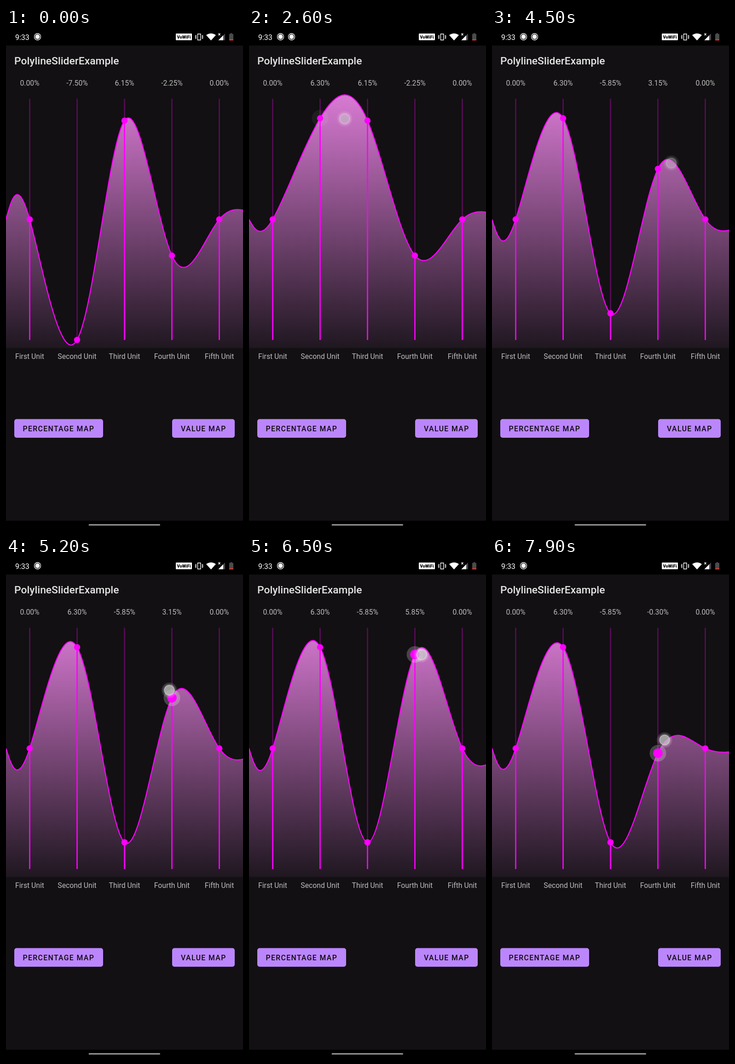
An HTML page that plays this animation: 515x1087 px, repeating every 8 s.

```html
<!DOCTYPE html>
<html lang="en">
<head>
<meta charset="utf-8">
<style>
  html, body { margin: 0; height: 100%; overflow: hidden; background: #000; }
  svg { display: block; width: 100%; height: 100%; font-family: Roboto, sans-serif; }
  .label { font-size: 15.75px; fill: #bdbcbd; text-anchor: middle; }
  .button { font-size: 15.75px; font-weight: 500; letter-spacing: 1.41px; fill: #0c090f; }
</style>
</head>
<body>
<svg id="stage" viewBox="0 0 515 1087">
  <defs>
    <linearGradient id="shade" gradientUnits="userSpaceOnUse" x1="0" y1="145" x2="0" y2="694">
      <stop offset="0" stop-color="#d87ad3"/>
      <stop offset="1" stop-color="#1f1720"/>
    </linearGradient>
    <radialGradient id="glow">
      <stop offset="0" stop-color="#c4c4c4" stop-opacity=".78"/>
      <stop offset=".5" stop-color="#cacaca" stop-opacity=".78"/>
      <stop offset=".6" stop-color="#e8e8e8" stop-opacity=".8"/>
      <stop offset=".66" stop-color="#fff" stop-opacity=".3"/>
      <stop offset="1" stop-color="#fff" stop-opacity="0"/>
    </radialGradient>
  </defs>
  <rect width="515" height="1087"/>
  <rect y="38" width="515" height="1031" fill="#121012"/>
  <rect x="179.5" y="1076.5" width="155.500" height="3" rx="1.500" fill="#9b9b9b"/>

  <!-- status bar -->
  <g fill="#fff">
    <text x="20" y="25.500" font-size="16">9:33</text>
    <g id="rec">
      <circle cx="68.500" cy="19" r="7" fill="none" stroke="#fff" stroke-width="1.300"/>
      <circle cx="68.500" cy="19" r="4.900"/>
    </g>
    <use id="rec2" href="#rec" x="24"/>
    <rect x="369" y="12" width="35" height="14.500" rx="1"/>
    <text x="386.500" y="22.800" font-size="9.500" font-weight="900" fill="#000" text-anchor="middle">VoWiFi</text>
    <path d="M416.500 13h6.500v13h-6.500zM411.500 15.500l1.800 2-1.800 2 1.800 2-1.800 2M428 15.500l-1.800 2 1.800 2-1.800 2 1.800 2" fill="none" stroke="#fff" stroke-width="1.400"/>
    <path d="M435 15.500Q445.500 8 456 15.500L445.500 27z"/>
    <path d="M476 12V26.500H461.500z" fill="#4a4a4a"/>
    <path d="M472 16V26.500H461.500z"/>
    <path d="M461.500 11.500l4 4.500m0-4.500l-4 4.500" stroke="#fff" stroke-width="1.200"/>
    <path d="M485 13h2.500v-1.800h4V13h2.500v14h-9z" fill="#4b4b4b"/>
    <path d="M485 24.500h9V27h-9z" fill="#d8362f"/>
  </g>

  <text x="18" y="78.500" font-size="22.850" font-weight="500" fill="#e6e5e6">PolylineSliderExample</text>

  <path id="area" fill="url(#shade)"/>
  <path id="curve" fill="none" stroke="#f0f" stroke-width="2.300"/>
  <g id="units"></g>
  <circle id="touch" r="18" fill="url(#glow)"/>

  <g fill="#bb86fc">
    <rect x="18" y="848.500" width="193" height="40.500" rx="5"/>
    <rect x="361" y="848.500" width="136" height="40.500" rx="5"/>
  </g>
  <text class="button" x="36.500" y="875">PERCENTAGE MAP</text>
  <text class="button" x="380" y="875">VALUE MAP</text>
</svg>
<script>
const LOOP = 8000, MID = 415.3, SCALE = 34.85, STEP = 0.15;
const START = [0, -7.5, 6.15, -2.25, 0];
const NAMES = ['First', 'Second', 'Third', 'Fourth', 'Fifth'];

// Each drag: unit index and keys of [time, touch x, touch y, value]
const DRAGS = [
  { unit: 1, keys: [[1700, 159, 663, -7.5], [1800, 160, 655, -7.5], [2400, 208, 197, 6.3], [2500, 208, 197, 6.3]] },
  { unit: 2, keys: [[2800, 262, 205, 6.15], [2900, 264, 210, 6.15], [3500, 315, 619, -5.85], [3640, 315, 619, -5.85]] },
  { unit: 3, keys: [[3800, 368, 488, -2.25], [3880, 369, 480, -2.25], [4270, 389.5, 293, 3.15], [4350, 389.5, 293, 3.15]] },
  { unit: 3, keys: [[5000, 354.5, 289, 3.15], [5250, 355, 289, 3.15], [5800, 368, 450, -1.05], [6450, 375, 212, 5.85],
                    [7050, 375, 212, 5.85], [7500, 375, 560, -4.2], [7900, 375, 397, -0.3], [8000, 375, 397, -0.3]] }
];

const $ = id => document.getElementById(id);
const clamp = v => Math.min(1, Math.max(0, v));
const smooth = u => u * u * (3 - 2 * u);
const unitX = i => 51.5 + 103 * i;

function make(parent, tag, attrs, text = '') {
  const el = document.createElementNS('http://www.w3.org/2000/svg', tag);
  set(el, attrs);
  el.textContent = text;
  return parent.appendChild(el);
}
function set(el, attrs) {
  for (const k in attrs) el.setAttribute(k, attrs[k]);
}

const units = NAMES.map((name, i) => {
  const g = $('units'), x = unitX(i);
  const line = opacity => make(g, 'line',
    { x1: x, x2: x, y1: 153.5, y2: 677, stroke: '#f0f', 'stroke-width': 2.6, 'stroke-opacity': opacity });
  make(g, 'text', { class: 'label', x, y: 718 }, name + ' Unit');
  line(0.3);
  return {
    bar: line(1),
    halo: make(g, 'circle', { cx: x, r: 18, fill: '#fff' }),
    knob: make(g, 'circle', { cx: x, fill: '#f0f' }),
    value: make(g, 'text', { class: 'label', x, y: 124.5 })
  };
});

function sample(keys, t) {
  const n = keys.findIndex(k => k[0] > t);
  if (n < 0) return keys[keys.length - 1];
  const a = keys[n - 1], b = keys[n], u = smooth((t - a[0]) / (b[0] - a[0]));
  return a.map((v, i) => v + (b[i] - v) * u);
}

// Natural cubic spline on uniform parameters, as Bezier coordinates per segment
function spline(p) {
  const m = p.map(() => 0);
  for (let pass = 0; pass < 30; pass++)
    for (let i = 1; i < p.length - 1; i++)
      m[i] = (6 * (p[i + 1] - 2 * p[i] + p[i - 1]) - m[i - 1] - m[i + 1]) / 4;
  return p.slice(1).map((q, i) => {
    const d = (q - p[i]) / 3;
    return [p[i] + d - (2 * m[i] + m[i + 1]) / 18, q - d - (m[i] + 2 * m[i + 1]) / 18, q];
  });
}
const segX = spline([0, ...[0, 1, 2, 3, 4, 5, 6].map(unitX)]);

function draw(t) {
  const values = [...START], press = [0, 0, 0, 0, 0];
  let touch = { opacity: 0 };
  for (const { unit, keys } of DRAGS) {
    const down = keys[0][0], up = keys[keys.length - 1][0];
    if (t < down) continue;
    const [, cx, cy, v] = sample(keys, t);
    values[unit] = Math.round(v / STEP) * STEP;
    press[unit] = t < up ? clamp((t - down - 30) / 100) : clamp(1 - (t - up) / 135);
    touch = { cx, cy, opacity: clamp(1 - (t - up) / 350) };
  }
  set($('touch'), touch);

  const ys = values.map(v => MID - v * SCALE);
  units.forEach((u, i) => {
    const cy = ys[i], v = Math.abs(values[i]) < 0.01 ? 0 : values[i];
    set(u.bar, { y1: cy });
    set(u.halo, { cy, opacity: 0.22 * press[i] });
    set(u.knob, { cy, r: 6.8 + 3.6 * clamp(press[i] * 2 - 1) });
    u.value.textContent = v.toFixed(2) + '%';
  });

  const segY = spline([MID, ...ys, MID, MID]);
  const path = `M0 ${MID}` + segX.map((xs, i) =>
    'C' + xs.map((x, k) => x.toFixed(2) + ' ' + segY[i][k].toFixed(2)).join(' ')).join('');
  set($('curve'), { d: path });
  set($('area'), { d: path + 'V694.5H0Z' });

  set($('rec2'), { opacity: t < 3000 ? clamp((t - 50) / 250) : clamp(1 - (t - 4850) / 200) });
}

function frame(now) {
  draw(now % LOOP);
  requestAnimationFrame(frame);
}
draw(0);
requestAnimationFrame(frame);
</script>
</body>
</html>
```
